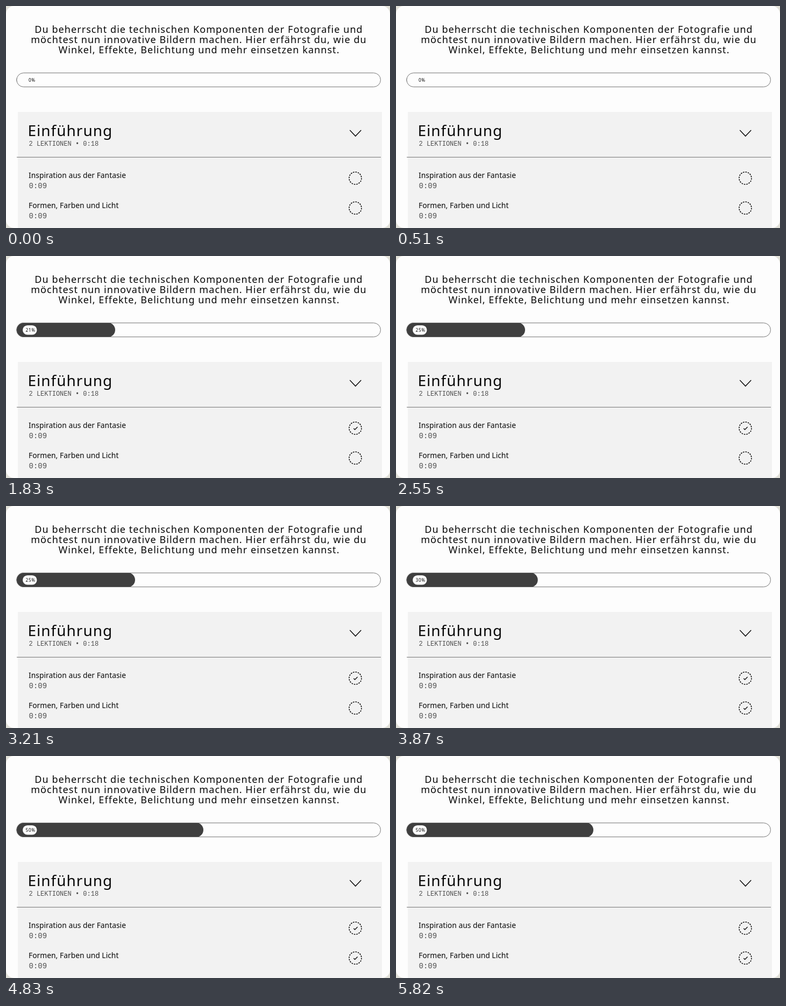
Animation, 714 px wide and 413 px high, one loop 5850 ms. Source, as an HTML page:

```html
<!DOCTYPE html>
<html lang="de">
<head>
<meta charset="utf-8">
<title>Kursfortschritt</title>
<style>
  html, body { margin: 0; width: 100%; height: 100%; overflow: hidden; background: #e2e1d9; }
  svg { display: block; width: 714px; height: 413px; }
  text { font-family: "Noto Sans", "Open Sans", sans-serif; fill: #080808; }
  .intro { font-size: 18px; letter-spacing: 1.06px; text-anchor: middle; }
  .title { font-size: 28px; letter-spacing: 1px; }
  .lesson { font-size: 13.8px; letter-spacing: .03px; }
  .mono { font-family: "Liberation Mono", "Courier New", monospace; font-size: 14px; fill: #505050; }
  .meta { font-size: 12px; }
  .percent { font-size: 8.2px; font-weight: 500; letter-spacing: .6px; text-anchor: end; }
  .line { fill: none; stroke: #111; stroke-width: 1.6; }
</style>
</head>
<body>
<svg viewBox="0 0 714 413">
  <defs>
    <clipPath id="track"><rect x="19.5" y="124" width="677.5" height="27" rx="13.5"/></clipPath>
    <circle id="ring" class="line" r="11.5" pathLength="64" stroke-dasharray="2.4 1.6"/>
    <path id="tick" class="line" d="M-3.7 0.2 L-1.2 2.7 L4.2 -2.7"/>
  </defs>
  <rect width="714" height="413" rx="15" fill="#fdfdfd"/>

  <text class="intro" x="358.5" y="50">Du beherrscht die technischen Komponenten der Fotografie und</text>
  <text class="intro" x="358.5" y="69">möchtest nun innovative Bildern machen. Hier erfährst du, wie du</text>
  <text class="intro" x="359" y="88">Winkel, Effekte, Belichtung und mehr einsetzen kannst.</text>

  <g clip-path="url(#track)">
    <rect id="fill" x="-680" y="124" width="700" height="27" rx="13.5" fill="#3f3f3f"/>
  </g>
  <rect x="19.8" y="124.5" width="676.7" height="26" rx="13" fill="none" stroke="#666" stroke-width=".9"/>
  <rect x="31" y="129" width="26.5" height="17.6" rx="8.8" fill="#fdfdfd"/>
  <text id="percent" class="percent" x="54.6" y="141">0%</text>

  <path d="M22 197H699V413H22Z" fill="#f2f2f2"/>
  <text class="title" x="40.5" y="242">Einführung</text>
  <text class="mono meta" x="42.5" y="260">2 LEKTIONEN • 0:18</text>
  <path class="line" d="M639.3 231 L649.8 242 L660.3 231"/>
  <path d="M20 281.3H697" stroke="#707070"/>

  <text class="lesson" x="42" y="320">Inspiration aus der Fantasie</text>
  <text class="mono" x="42.5" y="339">0:09</text>
  <text class="lesson" x="42" y="375.5">Formen, Farben und Licht</text>
  <text class="mono" x="42.5" y="394.5">0:09</text>

  <use href="#ring" x="649.5" y="320.3"/>
  <use href="#ring" x="649.5" y="375.8"/>
  <use id="tick1" href="#tick"/>
  <use id="tick2" href="#tick"/>
</svg>
<script>
const LOOP = 5850;
const get = id => document.getElementById(id);
const [fill, percent, tick1, tick2] = ['fill', 'percent', 'tick1', 'tick2'].map(get);

// Eased 0..1 progress of a step that begins at start and lasts length ms
function ease(t, start, length) {
  const p = Math.min(1, Math.max(0, (t - start) / length));
  return (1 - Math.cos(Math.PI * p)) / 2;
}

function placeTick(tick, y, progress) {
  tick.setAttribute('transform', `translate(649.8 ${y}) scale(${0.92 * progress})`);
  tick.setAttribute('visibility', progress > 0 ? 'visible' : 'hidden');
}

function draw(now) {
  const t = now % LOOP;
  const first = ease(t, 1100, 1000);
  const second = ease(t, 3587, 1000);
  fill.setAttribute('transform', `translate(${220 * first + 127 * second} 0)`);
  percent.textContent = Math.round(25 * first + 25 * second) + '%';
  placeTick(tick1, 320.5, ease(t, 900, 300));
  placeTick(tick2, 376, ease(t, 3387, 300));
  requestAnimationFrame(draw);
}
draw(0);
</script>
</body>
</html>
```
